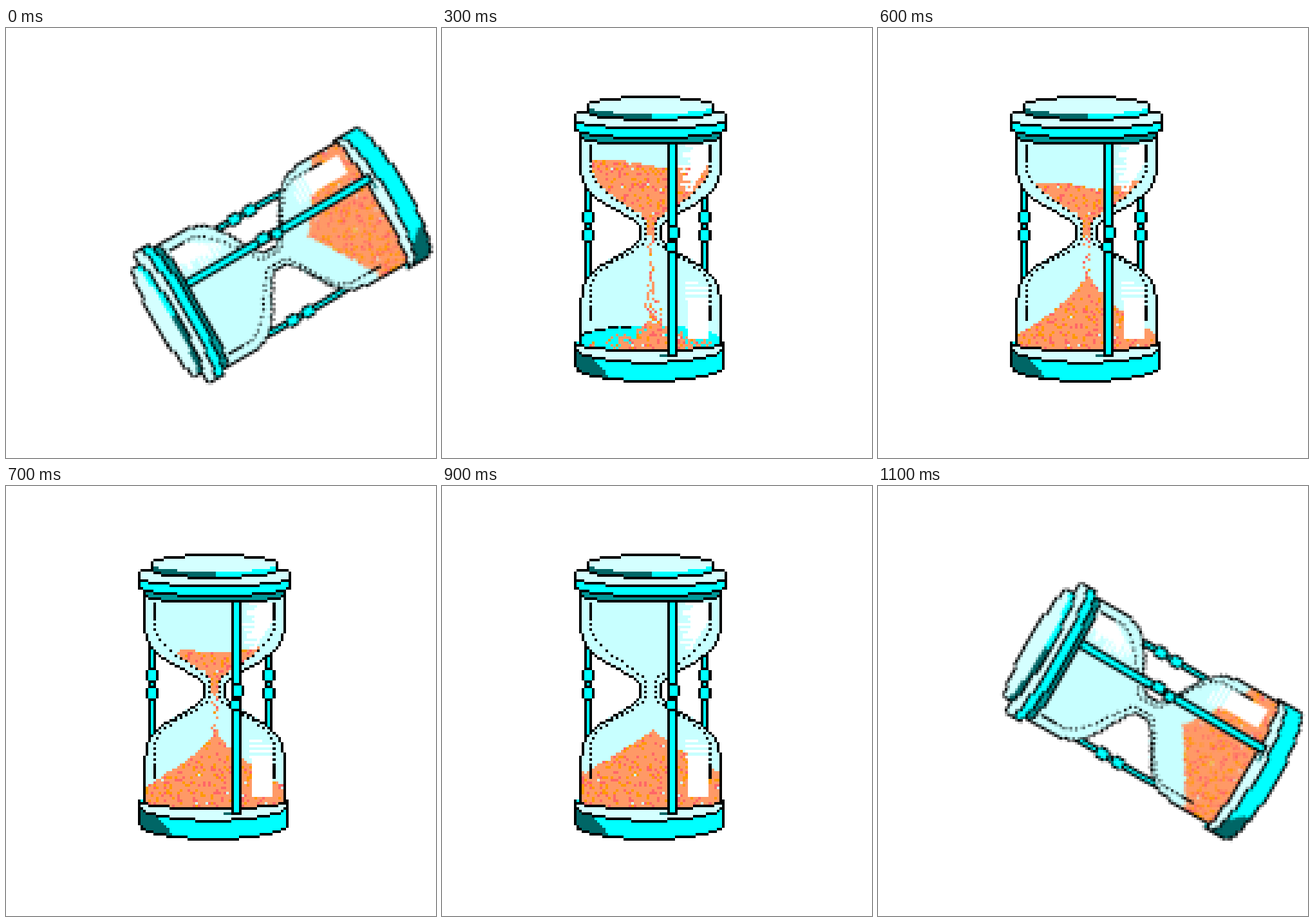
An HTML page with a canvas for the animation above (1.2 s loop, 668 px wide and 668 px high).

```html
<!DOCTYPE html>
<html lang="en">
<head>
<meta charset="utf-8">
<title>Hourglass</title>
<style>
  html, body { margin: 0; width: 100%; height: 100%; overflow: hidden; background: #fff; }
  canvas { display: block; width: 100vw; height: 100vh; image-rendering: pixelated; }
</style>
</head>
<body>
<canvas id="stage" width="166" height="166"></canvas>
<script>
const SIZE = 166, CELL = 668 / SIZE, MID = 324, STEP_MS = 100, STEPS = 12;
const BLACK = '#000', WHITE = '#fff', CYAN = '#00ffff', TEAL = '#009999', DARK = '#006666';
const GLASS = '#c8ffff', PALE = '#d4ffff', SAND = '#ff9966', RED = '#ff6666', AMBER = '#ff9900';

const stage = document.getElementById('stage').getContext('2d');
const sheet = document.createElement('canvas');
sheet.width = sheet.height = SIZE;
const pen = sheet.getContext('2d');

const cell = v => Math.floor(v / CELL);
const center = i => (i + .5) * CELL;
const reversed = pts => [...pts].reverse();

function hash(x, y, seed = 0) {
  let h = Math.imul(x + 17, 374761393) ^ Math.imul(y + 31, 668265263) ^ Math.imul(seed + 7, 1274126177);
  h = Math.imul(h ^ (h >>> 13), 1103515245);
  return ((h ^ (h >>> 16)) >>> 0) / 4294967296;
}

// Pixel drawing: all coordinates below are stage pixels.
function rect(x0, y0, x1, y1, color) {
  pen.fillStyle = color;
  pen.fillRect(cell(x0), cell(y0), cell(x1) - cell(x0) + 1, cell(y1) - cell(y0) + 1);
}

function fill(pts, color) {
  pen.fillStyle = color;
  for (let row = 0; row < SIZE; row++) {
    const y = center(row), hits = [];
    pts.forEach(([x0, y0], i) => {
      const [x1, y1] = pts[(i + 1) % pts.length];
      if ((y0 <= y) !== (y1 <= y)) hits.push(x0 + (x1 - x0) * (y - y0) / (y1 - y0));
    });
    hits.sort((a, b) => a - b);
    for (let i = 0; i + 1 < hits.length; i += 2) {
      const from = Math.round(hits[i] / CELL), to = Math.round(hits[i + 1] / CELL);
      pen.fillRect(from, row, to - from, 1);
    }
  }
}

function line(pts, color = BLACK, accept = () => true) {
  pen.fillStyle = color;
  let count = 0;
  for (let i = 1; i < pts.length; i++) {
    const [x0, y0] = pts[i - 1].map(cell), [x1, y1] = pts[i].map(cell);
    const n = Math.max(Math.abs(x1 - x0), Math.abs(y1 - y0));
    for (let k = i > 1 ? 1 : 0; k <= n; k++) {
      const x = Math.round(x0 + (x1 - x0) * k / n), y = Math.round(y0 + (y1 - y0) * k / n);
      if (accept(center(y), count++)) pen.fillRect(x, y, 1, 1);
    }
  }
}

// Half ellipse from left to right; a positive depth bulges downwards.
function arc(cx, half, y, depth) {
  const n = Math.round(2 * half / CELL);
  return Array.from({ length: n + 1 }, (_, i) => {
    const u = 2 * i / n - 1;
    return [cx + half * u, y + depth * Math.sqrt(1 - u * u)];
  });
}

const rimArc = (y, depth) => arc(MID, 118, y, depth);
const baseArc = (y, depth) => arc(322, 116, y, depth);
const lidArc = (y, depth) => arc(323, 96, y, depth);

// Half width of the glass at a height: wide bulbs easing into a neck.
function bulb(y, wide, neck, [top, neckTop, neckBottom, bottom]) {
  const t = y < neckTop ? Math.max(0, (y - top) / (neckTop - top)) ** 1.5
    : y > neckBottom ? Math.max(0, (bottom - y) / (bottom - neckBottom)) ** 1.7 : 1;
  return neck + (wide - neck) * (1 + Math.cos(Math.PI * t)) / 2;
}
const outer = y => bulb(y, 107, 17, [215, 310, 322, 430]);
const inner = y => bulb(y, 93, 7, [200, 308, 324, 425]);

function wall(profile, side, from, to) {
  const pts = [];
  for (let y = from; y <= to; y += CELL) pts.push([MID + side * profile(y), y]);
  return pts;
}

const floorFront = baseArc(488, 14);
const floorBack = arc(MID, 107, 482, -20);
const frontY = x => 488 + 14 * Math.sqrt(Math.max(0, 1 - ((x - 322) / 116) ** 2));

// Sand levels as functions of the step.
function topSurface(x, step) {
  const s = step - 1;
  const level = 196 + 56 * (s / 6) ** 1.4;
  const dip = 12 * Math.sin(Math.PI * s / 8) * Math.exp(-(((x - 345) / 40) ** 2));
  return level + dip + (.09 - .025 * s) * (x - MID);
}

const peak = step => 376 + 32 * Math.max(0, 5 - step);

function pileSurface(x, step) {
  const foot = 505 - 10 * (step - 3), sharpness = .5 + .05 * (step - 3);
  return peak(step) + (foot - peak(step)) * (Math.abs(x - 326) / 107) ** sharpness;
}

function grain(x, y) {
  const h = hash(x, y);
  pen.fillStyle = h < .13 ? RED : h < .23 ? AMBER : h < .245 ? PALE : SAND;
  pen.fillRect(x, y, 1, 1);
}

function eachCell(from, to, profile, visit) {
  for (let row = cell(from); row < cell(to); row++) {
    const y = center(row), half = profile(y);
    for (let col = cell(MID - half) + 1; center(col) < MID + half; col++) visit(col, row, center(col), y);
  }
}

function drawSand(step) {
  if (step < 9) {
    eachCell(180, 322, inner, (col, row, x, y) => {
      if (y > topSurface(x, step)) grain(col, row);
    });
    drawStream(step);
  }
  if (step < 3) return;
  const scatter = step < 4 ? 30 : step < 6 ? 10 : 4;
  eachCell(360, 505, outer, (col, row, x, y) => {
    const jitter = (hash(col, row, step) - .5) * scatter;
    if (y > pileSurface(x, step) + jitter && y < frontY(x)) grain(col, row);
  });
}

function drawStream(step) {
  const end = Math.min(342 + 70 * (step - 1), peak(step) + 10);
  for (let row = cell(300); center(row) < end; row++) {
    const y = center(row), spread = step < 4 ? 1 + Math.max(0, y - 395) / 16 : 1;
    const count = y < 325 ? 2 : spread > 1 ? 3 : 1;
    for (let k = 0; k < count; k++) {
      if (hash(k, row, step) < .85) grain(80 + Math.round((hash(row, k, step) - .4) * 2 * spread), row);
    }
  }
}

function post(x0, x1, y0, y1) {
  rect(x0, y0, x1, y1, BLACK);
  rect(x0 + CELL, y0, x1 - CELL, y1, CYAN);
}

function knob(x0, x1, y0, y1) {
  post(x0, x1, y0, y1);
  rect(x0 + CELL, y0 - CELL, x1 - CELL, y0 - CELL, BLACK);
  rect(x0 + CELL, y1 + CELL, x1 - CELL, y1 + CELL, BLACK);
}

function backPost(x, y0, y1) {
  post(x - 4, x + 4, y0, y1);
  knob(x - 8, x + 8, 289, 300);
  knob(x - 8, x + 8, 315, 326);
}

// White reflections on the right, with ragged left edges.
function drawShine() {
  for (let y = 183; y < 254; y += CELL) {
    const left = 368 + 26 * hash(cell(y), 3);
    rect(left, y, 412 - .65 * Math.max(0, y - 212), y, WHITE);
  }
  for (let y = 396; y < 424; y += 2 * CELL) rect(380, y, y < 402 ? 397 : 412, y, WHITE);
  rect(385, 426, 412, 481, WHITE);
}

function drawGlass(step) {
  backPost(227, 230, 400);
  backPost(408, 244, 390);
  fill([...wall(outer, -1, 165, 500), ...reversed(wall(outer, 1, 165, 500))], GLASS);
  fill([...floorBack, ...reversed(floorFront)], CYAN);
  line(floorBack.filter(([x]) => x > 216 && x < 295), BLACK, (y, n) => n % 5);
  drawSand(step);
  drawShine();

  const dashed = (y, n) => y < 211 || y > 429 || n % 2 === 0;
  for (const side of [-1, 1]) {
    line(wall(inner, side, 182, 453), BLACK, dashed);
    line(wall(outer, side, 165, 488));
  }
}

function drawBase() {
  const edge = baseArc(497, 23), bottom = baseArc(525, 24);
  fill([...floorFront, ...reversed(bottom)], PALE);
  fill([...edge, ...reversed(bottom)], CYAN);
  fill([...edge.filter(([x]) => x < 236), ...reversed(bottom.filter(([x]) => x < 264))], DARK);
  [floorFront, edge, bottom].forEach(curve => line(curve));
  for (const x of [206, 438]) line([[x, 488], [x, 525]]);
}

function drawFrontPost() {
  post(352, 363, 180, 509);
  rect(341, 511, 350, 511, DARK);
  rect(352, 511, 363, 511, BLACK);
  knob(352, 368, 311, 323);
  knob(350, 366, 336, 346);
}

function drawCap() {
  const ring = arc(MID, 107, 170, 11);
  fill([[217, 160], [431, 160], ...reversed(ring)], TEAL);
  line(ring);
  for (const x of [217, 431]) line([[x, 162], [x, 180]]);

  const top = rimArc(136, -14), edge = rimArc(142, 14), bottom = rimArc(157, 14);
  fill([...top, ...reversed(bottom)], PALE);
  fill([...edge, ...reversed(bottom)], CYAN);
  [top, edge, bottom].forEach(curve => line(curve));
  for (const x of [206, 442]) line([[x, 136], [x, 157]]);

  const crown = lidArc(120, -13), lip = lidArc(131, 11);
  fill([...crown, ...reversed(lip)], PALE);
  for (const lift of [7, 4]) {
    const band = lidArc(131 - lift, 11);
    line(band.filter(([x]) => x < 326), DARK);
    line(band.filter(([x]) => x >= 326), CYAN);
  }
  line(crown);
  line(lip);
  for (const x of [227, 419]) line([[x, 120], [x, 131]]);
}

// Poses while turning over: degrees and where the middle sits.
const TILTS = { 10: [30, 395, 333], 11: [60, 426, 350], 0: [120, 427, 354] };

function draw(step) {
  pen.clearRect(0, 0, SIZE, SIZE);
  drawGlass(step === 0 ? 9 : Math.min(step, 9));
  drawBase();
  drawFrontPost();
  drawCap();

  stage.setTransform(1, 0, 0, 1, 0, 0);
  stage.fillStyle = WHITE;
  stage.fillRect(0, 0, SIZE, SIZE);
  if (TILTS[step]) {
    const [angle, x, y] = TILTS[step];
    stage.translate(x / CELL, y / CELL);
    stage.rotate(-angle * Math.PI / 180);
    stage.translate(-323 / CELL, -328 / CELL);
  }
  stage.drawImage(sheet, 0, 0);
}

const start = performance.now();
let shown = -1;

function tick() {
  const step = Math.floor((performance.now() - start) / STEP_MS) % STEPS;
  if (step !== shown) draw(shown = step);
  requestAnimationFrame(tick);
}
tick();
</script>
</body>
</html>
```
